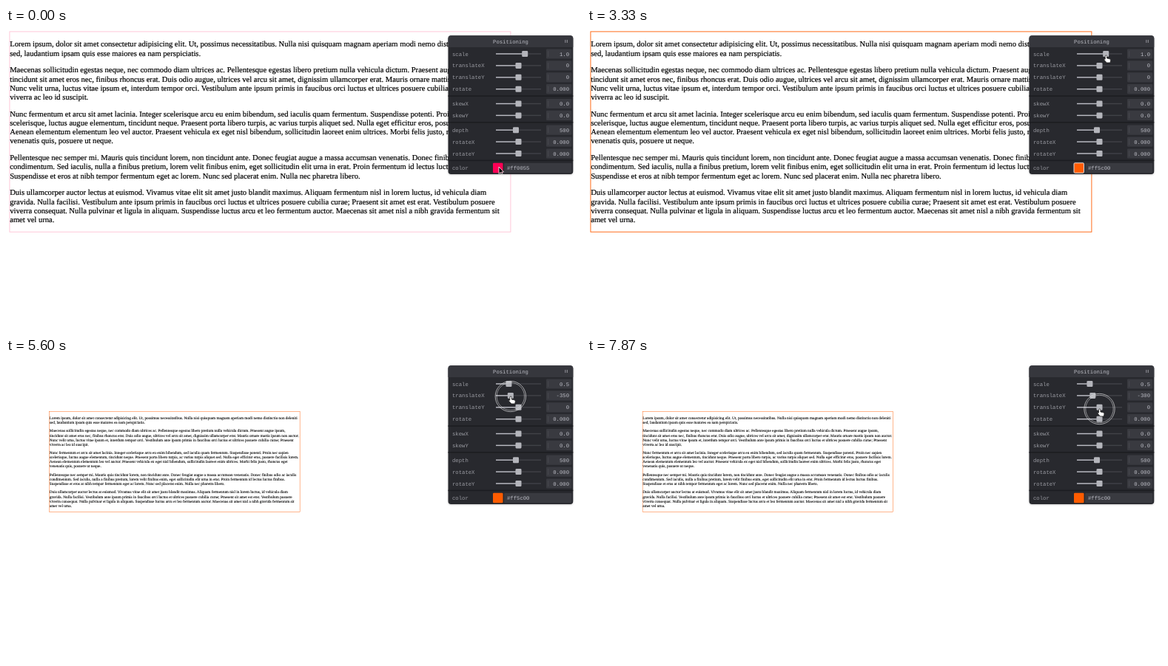
An HTML page that plays this animation: 777 by 409 pixels, repeating every 8000 ms.

```html
<!DOCTYPE html>
<html lang="en">
<head>
<meta charset="utf-8">
<title>Positioning</title>
<style>
html, body { margin: 0; width: 100%; height: 100%; overflow: hidden; background: #fff; }
svg { display: block; }
text { text-rendering: geometricPrecision; white-space: pre; }
#page text { font: 10.59px "Liberation Serif", Times, serif; stroke: #000; stroke-width: .2px; }
#panel text { font: 7.26px "Liberation Mono", "DejaVu Sans Mono", monospace; fill: #bbbcc4; }
#panel .label { fill: #9b9ca3; }
#panel .end { text-anchor: end; }
.field { fill: #393a40; }
</style>
</head>
<body>
<svg width="777" height="409" viewBox="0 0 777 409">
  <defs>
    <clipPath id="clip"><rect id="clipBox" x="597.5" y="10.3" width="168.8" rx="4"/></clipPath>
    <linearGradient id="white"><stop stop-color="#fff"/><stop offset="1" stop-color="#fff" stop-opacity="0"/></linearGradient>
    <linearGradient id="black" x2="0" y2="1"><stop stop-opacity="0"/><stop offset="1"/></linearGradient>
    <linearGradient id="hues"></linearGradient>
  </defs>
  <g id="page"><rect id="frame" x="4.9" y="4.9" width="677" height="271.3" fill="none"/></g>
  <rect id="back" x="597.5" y="10.3" width="168.8" rx="4" fill="#28292e" style="filter:drop-shadow(0 1.3px 1.3px rgba(0,0,0,.2))"/>
  <g id="panel" clip-path="url(#clip)"></g>
  <g id="ring" fill="none" stroke="#e4e4e6" stroke-width=".9">
    <circle r="20.7" stroke-opacity=".75"/><circle r="18.7" stroke-opacity=".6"/>
  </g>
  <g id="cursor" stroke-linejoin="round" stroke-width=".8">
    <path id="arrow" d="M0 0V9.5L2.2 7.5L3.7 11L5.2 10.3L3.7 7H6.6Z" stroke="#fff"/>
    <path id="hand" d="M-1 1.3q0-1.3 1.2-1.3q1.2 0 1.2 1.3V4l3.5.8q1.8.4 1.6 2L5.8 10H1L-2.5 6q-.3-1.4 1.5-.8Z" fill="#fff" stroke="#222"/>
  </g>
</svg>
<script>
const PARAGRAPHS = [`Lorem ipsum, dolor sit amet consectetur adipisicing elit. Ut, possimus necessitatibus. Nulla nisi quisquam magnam aperiam modi nemo distinctio non deleniti
sed, laudantium ipsam quis esse maiores ea nam perspiciatis.`,
`Maecenas sollicitudin egestas neque, nec commodo diam ultrices ac. Pellentesque egestas libero pretium nulla vehicula dictum. Praesent augue ipsum,
tincidunt sit amet eros nec, finibus rhoncus erat. Duis odio augue, ultrices vel arcu sit amet, dignissim ullamcorper erat. Mauris ornare mattis ipsum non auctor.
Nunc velit urna, luctus vitae ipsum et, interdum tempor orci. Vestibulum ante ipsum primis in faucibus orci luctus et ultrices posuere cubilia curae; Praesent
viverra ac leo id suscipit.`,
`Nunc fermentum et arcu sit amet lacinia. Integer scelerisque arcu eu enim bibendum, sed iaculis quam fermentum. Suspendisse potenti. Proin nec sapien
scelerisque, luctus augue elementum, tincidunt neque. Praesent porta libero turpis, ac varius turpis aliquet sed. Nulla eget efficitur eros, posuere facilisis lorem.
Aenean elementum elementum leo vel auctor. Praesent vehicula ex eget nisl bibendum, sollicitudin laoreet enim ultrices. Morbi felis justo, rhoncus eget
venenatis quis, posuere ut neque.`,
`Pellentesque nec semper mi. Mauris quis tincidunt lorem, non tincidunt ante. Donec feugiat augue a massa accumsan venenatis. Donec finibus odio ac iaculis
condimentum. Sed iaculis, nulla a finibus pretium, lorem velit finibus enim, eget sollicitudin elit urna in erat. Proin fermentum id lectus luctus finibus.
Suspendisse et eros at nibh tempor fermentum eget ac lorem. Nunc sed placerat enim. Nulla nec pharetra libero.`,
`Duis ullamcorper auctor lectus at euismod. Vivamus vitae elit sit amet justo blandit maximus. Aliquam fermentum nisl in lorem luctus, id vehicula diam
gravida. Nulla facilisi. Vestibulum ante ipsum primis in faucibus orci luctus et ultrices posuere cubilia curae; Praesent sit amet est erat. Vestibulum posuere
viverra consequat. Nulla pulvinar et ligula in aliquam. Suspendisse luctus arcu et leo fermentum auctor. Maecenas sit amet nisl a nibh gravida fermentum sit
amet vel urna.`];

const $ = id => document.getElementById(id);
const set = (el, attrs) => { for (const k in attrs) el.setAttribute(k, attrs[k]); return el; };
const add = (parent, tag, attrs, content = '') => {
  const el = set(document.createElementNS('http://www.w3.org/2000/svg', tag), attrs);
  el.textContent = content;
  return parent.appendChild(el);
};
const panel = $('panel');
const box = (x, y, width, height, attrs) => add(panel, 'rect', { x, y, width, height, ...attrs });
const text = (x, y, str, cls = '') => add(panel, 'text', { x, y: y + 2.5, class: cls }, str);
const clamp = (v, lo, hi) => Math.min(hi, Math.max(lo, v));

// Page text
let baseline = 25.3;
for (const p of PARAGRAPHS) {
  for (const line of p.split('\n')) {
    add($('page'), 'text', { x: 5.2, y: baseline }, line);
    baseline += 12.2;
  }
  baseline += 10.6;
}

// Panel: title and slider rows
box(597, 10, 170, 16, { fill: '#36373d' });
set(text(682, 18, 'Positioning'), { 'text-anchor': 'middle' });
for (const x of [755.2, 757.8]) box(x, 16, 1.2, 4, { fill: '#85868d' });

function slider(name, y) {
  text(603, y, name, 'label');
  box(662, y - .7, 61, 1.4, { fill: '#414248' });
  const bar = box(662, y - .7, 0, 1.4, { fill: '#bbbcc4' });
  const knob = box(0, y - 4, 8, 8, { rx: 1.3, fill: '#b4b5bb' });
  box(730, y - 6.6, 34.5, 13.2, { rx: 1.3, class: 'field' });
  box(732, y - 4, 1.3, 8, { rx: .6, fill: '#44454b' });
  const value = text(761, y, '', 'end');
  return (str, x = 692.5) => {
    value.textContent = str;
    set(bar, { width: x - 662 });
    set(knob, { x: x - 4 });
  };
}
const rows = {};
let rowY = 35;
for (const group of ['scale translateX translateY rotate', 'skewX skewY', 'depth rotateX rotateY']) {
  for (const name of group.split(' ')) {
    rows[name] = slider(name, rowY);
    rows[name](name.startsWith('skew') ? '0.0' : '0.000');
    rowY += 15.9;
  }
  box(597, rowY - 7.3, 170, 1.6, { fill: '#1c1d21' });
  rowY += 3.9;
}
rows.depth('500', 689);

// Panel: colour row and picker
const colorLabel = text(603, 189.5, 'color', 'label');
box(673, 183, 91.5, 13.2, { class: 'field', rx: 1.3 });
const swatch = box(658, 182.8, 13.5, 13.5, { rx: 1.3 });
const hex = text(677, 189.5, '');
const palette = box(658, 198.5, 105.5, 53, { rx: 1.3 });
for (const id of ['white', 'black']) box(658, 198.5, 105.5, 53, { rx: 1.3, fill: `url(#${id})` });
add(panel, 'circle', { cx: 761.8, cy: 200.8, r: 1.6, fill: 'none', stroke: '#fff', 'stroke-width': .6 });
for (let i = 0; i < 7; i++) add($('hues'), 'stop', { offset: i / 6, 'stop-color': `hsl(${i * 60},100%,50%)` });
box(662, 260.2, 98, 2.1, { rx: 1, fill: 'url(#hues)' });
const hueKnob = box(0, 257.2, 8, 8, { rx: 1.3, stroke: '#ddd', 'stroke-width': .8 });
text(661, 277, 'RGB');
add(panel, 'path', { d: 'M677 276h4l-2 2.4z', fill: '#bbbcc4' });
const channels = [0, 1, 2].map(i => {
  box(688 + i * 25.7, 270.4, 25, 13.2, { class: 'field' });
  return text(710 + i * 25.7, 277, '', 'end');
});

// A draggable control: value range, track, and the time it is held down
const control = (min, max, left, width, y, from, to) => ({
  from, to,
  at: v => ({ x: left + width * (v - min) / (max - min), y }),
  read: t => min + (max - min) * (pointer(clamp(t, from, to)).x - left) / width
});
const hue = control(0, 360, 660, 98, 261, 1050, 2260);
const scale = control(.1, 1.5, 662, 61, 37, 3500, 4480);
const moveX = control(-1000, 1000, 662, 61, 52, 4850, 5900);
const moveY = control(-700, 700, 662, 61, 69, 6480, 8100);
const clicks = [{ from: 250, to: 450 }, { from: 2620, to: 2820 }];
const presses = [...clicks, hue, scale, moveX, moveY];

// Pointer moves: start, end, destination
const HOME = { x: 666, y: 188 };
const MOVES = [
  [450, 950, hue.at(340)],
  [1100, 1930, hue.at(31.53)],
  [2000, 2200, hue.at(21.65)],
  [2350, 2600, HOME],
  [2900, 3300, scale.at(1)],
  [3700, 4450, scale.at(.5)],
  [4500, 4720, moveX.at(0)],
  [4900, 5320, moveX.at(-550)],
  [5420, 5590, moveX.at(-350)],
  [5640, 5800, moveX.at(-300)],
  [6000, 6300, moveY.at(0)],
  [6550, 6850, moveY.at(-50)],
  [7200, 7360, moveY.at(0)],
  [7600, 7700, moveY.at(-50)],
  [7760, 7870, moveY.at(0)]
];
const ease = (t, a, b) => {
  const u = clamp((t - a) / (b - a), 0, 1);
  return u * u * (3 - 2 * u);
};
function pointer(t) {
  let { x, y } = HOME;
  for (const [a, b, to] of MOVES) {
    const u = ease(t, a, b);
    x += (to.x - x) * u;
    y += (to.y - y) * u;
  }
  return { x, y };
}
const snap = (v, step) => Math.round(v / step) * step || 0;

function rgb(h) {
  return [0, 4, 2].map(n => Math.round(255 * clamp(Math.abs((h / 60 + n) % 6 - 3) - 1, 0, 1)));
}

function draw(t) {
  const h = hue.read(t), color = rgb(h);
  const code = '#' + color.map(c => c.toString(16).padStart(2, '0')).join('');
  const s = snap(scale.read(t), .1), x = snap(moveX.read(t), 50), y = snap(moveY.read(t), 50);

  set($('page'), { transform: `translate(343.4 140.5) scale(${s}) translate(${x * .66} ${y * .66}) translate(-343.4 -140.5)` });
  set($('frame'), { stroke: code, 'stroke-opacity': t < hue.from ? .22 : .9 });
  rows.scale(s.toFixed(1), scale.at(s).x);
  rows.translateX(x, moveX.at(x).x);
  rows.translateY(y, moveY.at(y).x);

  const open = ease(t, 380, 560) - ease(t, 2650, 2730), height = 187.7 + 88 * open;
  set($('back'), { height });
  set($('clipBox'), { height });
  set(colorLabel, { y: 192 + 44 * open });
  set(swatch, { fill: code, stroke: t > 2620 && t < 3600 ? '#d8d8dc' : 'none' });
  hex.textContent = code;
  set(palette, { fill: code });
  set(hueKnob, { x: hue.at(h).x - 2, fill: code });
  channels.forEach((el, i) => el.textContent = color[i]);

  const p = pointer(t), place = `translate(${p.x} ${p.y})`;
  const press = Math.max(0, ...presses.map(({ from, to }) => Math.min(1, (t - from) / 90, (to - t) / 90)));
  set($('ring'), { transform: `${place} scale(${.6 + .4 * press})`, opacity: press });
  set($('cursor'), { transform: place });
  set($('arrow'), { opacity: t < 200 ? 1 : 0 });
  set($('hand'), { opacity: t < 200 ? 0 : 1 });
}

const start = performance.now();
function tick() {
  draw((performance.now() - start) % 8000);
  requestAnimationFrame(tick);
}
tick();
</script>
</body>
</html>
```
